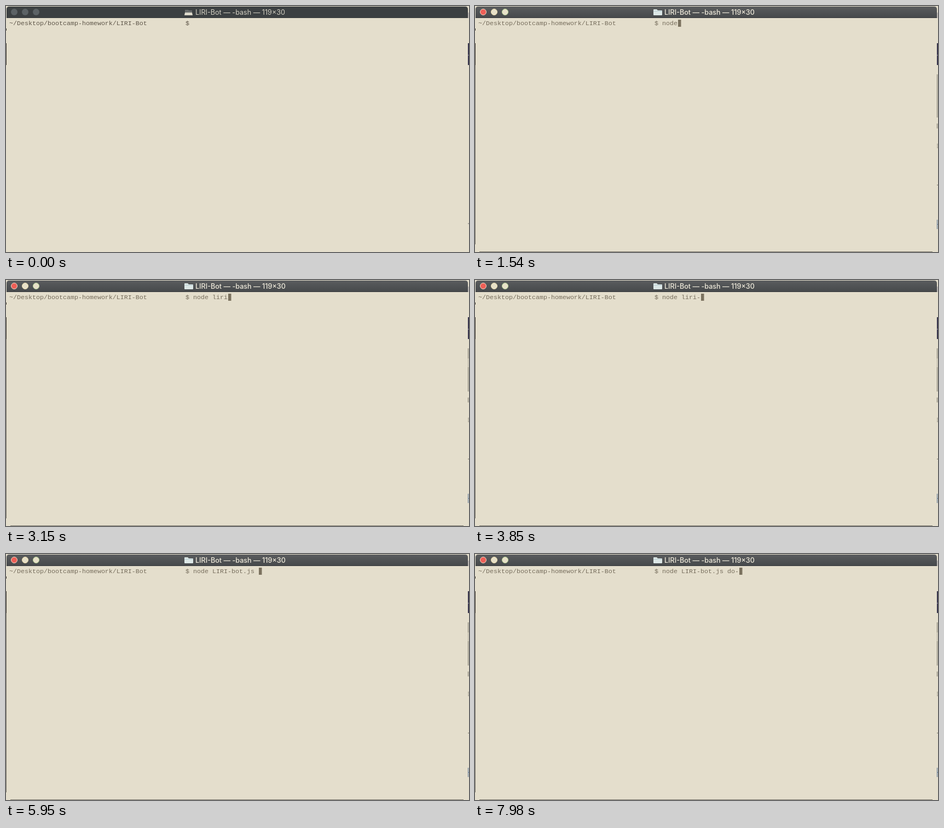
An HTML page that plays this animation: 846x450 px, repeating every 8000 ms.

```html
<!DOCTYPE html>
<html lang="en">
<head>
<meta charset="utf-8">
<title>Terminal</title>
<style>
  html, body { margin: 0; width: 100%; height: 100%; overflow: hidden; background: #e4decc; }
  svg { display: block; width: 846px; height: 450px; }
  .mono { font: 11.667px "Liberation Mono", monospace; white-space: pre; fill: #776e5d; }
  .title { font: 500 12.6px Inter, sans-serif; fill: #efeadb; }
  .idle .mono { fill: #5f574a; }
  .idle .title { font-weight: 400; fill: #d3cfc2; }
  .idle .on, .off { display: none; }
  .idle .off { display: inline; }
</style>
</head>
<body>
<svg id="stage" class="idle" viewBox="0 0 846 450">
  <defs>
    <linearGradient id="bar" x2="0" y2="1">
      <stop stop-color="#5a5c5e"/>
      <stop offset="1" stop-color="#46494b"/>
    </linearGradient>
  </defs>
  <rect width="846" height="450" fill="#e4decc"/>

  <path id="frame" d="M1 22V6q0-5 5-5H839q5 0 5 5V22Z"/>
  <path d="M1 21.5H844" stroke="#35383a"/>
  <g class="off" fill="#5c6265">
    <circle cx="15" cy="11" r="6"/>
    <circle cx="35" cy="11" r="6"/>
    <circle cx="55" cy="11" r="6"/>
    <path d="M327 7h6l1 1h6v5h-13z" fill="#686b6b"/>
    <path d="M327 12h13l1 5h-15z" fill="#dcd8ca"/>
  </g>
  <g class="on" fill="#e8e1c9">
    <circle cx="15" cy="11" r="5.5" fill="#ee5f57" stroke="#f0d8c4"/>
    <circle cx="35" cy="11" r="5.5" stroke="#eee0b0"/>
    <circle cx="55" cy="11" r="5.5" stroke="#b9d69a"/>
    <path d="M326 7q0-1 1-1h5l2 2h7q1 0 1 1v7q0 1-1 1h-14q-1 0-1-1z" fill="#dce7e6"/>
    <path d="M326.500 9.500h15" stroke="#b4cbd2"/>
  </g>
  <text class="title" x="346" y="16">LIRI-Bot — -bash — 119×30</text>

  <text class="mono" x="6" y="35">~/Desktop/bootcamp-homework/LIRI-Bot</text>
  <text class="mono" x="328" y="35">$</text>
  <text class="mono" x="342" y="35" id="cmd"></text>
  <rect class="on" id="cursor" y="25" width="5.500" height="13" fill="#7b725f"/>

  <path d="M0 68h1v40h-1zM0 41h1v4h-1z" fill="#3b342e"/>
  <path d="M844 68h2v40h-2z" fill="#35324a"/>
  <path d="M844 90h2M845 12v10" stroke="#9693a0"/>
  <path class="off" d="M844 398h2" stroke="#666"/>
  <g class="on" fill="none" stroke="#777469">
    <path d="M.5 108V436M8 449.500H836"/>
    <path d="M845 252v8" stroke-dasharray="2 1"/>
    <path d="M844 327.500h2"/>
    <path d="M844.500 391v17M845 399.500h1" stroke="#5a7393"/>
    <path class="early" d="M844 125.500h2M845 192v9M845 217v8" stroke-dasharray="2 1"/>
    <path class="late" d="M844.500 125v18M844.500 160v44M844.500 215v9"/>
    <path class="late" id="edge" d="M844.500 143v17"/>
  </g>
</svg>
<script>
const LOOP = 8000, CELL = 7, LEFT = 342;
const ACTIVE = 70, EDGE = 910, DOTS = 2660;
const keys = [
  [0, ""], [1120, "n"], [1260, "no"], [1400, "nod"], [1540, "node"], [1680, "node "],
  [2100, "node l"], [2380, "node li"], [2800, "node lir"], [3080, "node liri"],
  [3640, "node liri-"], [4340, "node liri-b"], [4900, "node liri-bo"],
  [5250, "node LIRI-bot.js "], [6790, "node LIRI-bot.js d"],
  [7140, "node LIRI-bot.js do"], [7840, "node LIRI-bot.js do-"]
];
const $ = id => document.getElementById(id);
const stage = $("stage"), frame = $("frame"), cmd = $("cmd"), cursor = $("cursor"), edge = $("edge");
const early = document.querySelector(".early"), late = document.querySelectorAll(".late");
const show = (el, on) => el.setAttribute("visibility", on ? "visible" : "hidden");

function draw(now) {
  const t = now % LOOP;
  const text = keys.filter(k => k[0] <= t).pop()[1];
  const active = t >= ACTIVE;
  stage.classList.toggle("idle", !active);
  frame.setAttribute("fill", active ? "url(#bar)" : "#3c4042");
  cmd.textContent = text;
  cursor.setAttribute("x", LEFT + 1 + text.length * CELL);
  show(early, t < EDGE);
  late.forEach(el => show(el, t >= EDGE));
  edge.setAttribute("stroke-dasharray", t < DOTS ? "none" : "1 1");
  requestAnimationFrame(() => draw(performance.now()));
}
draw(0);
</script>
</body>
</html>
```
